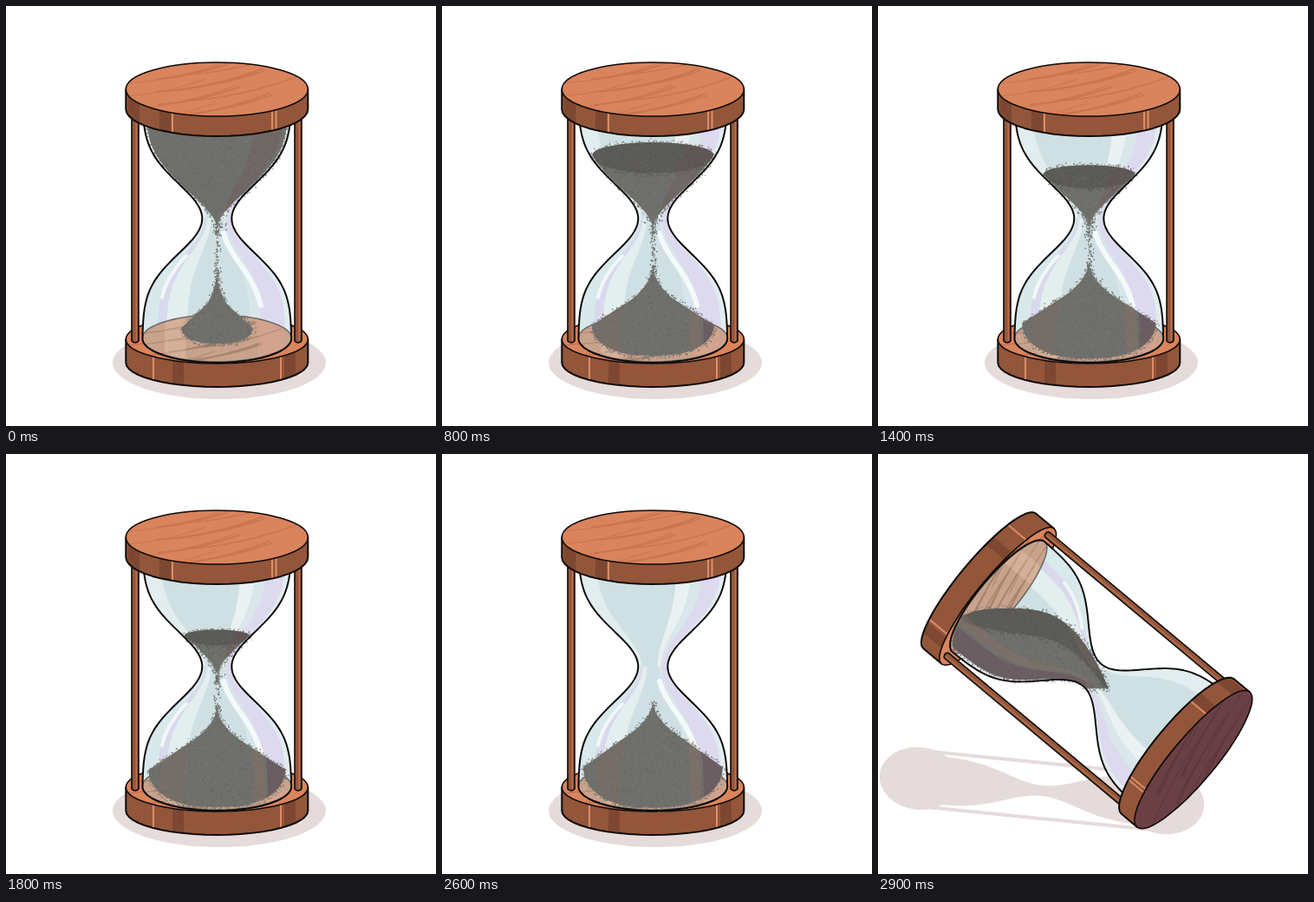
An HTML page with a canvas that plays this animation: 496 by 484 pixels, repeating every 3.1 s.

```html
<!DOCTYPE html>
<html lang="en">
<head>
<meta charset="utf-8">
<title>Hourglass</title>
<style>
html, body { margin: 0; width: 100%; height: 100%; overflow: hidden; background: #fff; }
canvas { display: block; }
</style>
</head>
<body>
<canvas id="stage" width="496" height="484"></canvas>
<script>
const ctx = document.getElementById('stage').getContext('2d');
const CX = 243.3, NECK = 245, FLOOR = 383, INK = '#0d0a09', SHADOW = '#e5dbda';
const WOOD = '#93563a', WOOD_DARK = '#7d4731', WOOD_LIGHT = '#dd8d66', FACE = '#d9845c';
const SAND = '#6f706b', SAND_TOP = '#5c5b57', LAVENDER = '#dddaf0', MIST = '#e1edee';

let seed = 1;
let flat = 1; // how open the discs look: 1 upright, less when tipped
const rnd = () => (seed = (seed * 16807) % 2147483647) / 2147483647;
const fuzz = s => (rnd() + rnd() + rnd() - 1.5) * s;
const bell = (d, width) => 1 - Math.exp(-((d / width) ** 2));

const glassHalf = y => 17 + 69 * bell(y - NECK, 57);
const sandHalf = y => glassHalf(y) * .96 * bell(y - 256, 22);

function fill(path, color) { ctx.fillStyle = color; ctx.fill(path); }

function stroke(path, width, color = INK) {
  ctx.lineWidth = width;
  ctx.strokeStyle = color;
  ctx.stroke(path);
}

function inside(path, draw) {
  ctx.save();
  ctx.clip(path);
  draw();
  ctx.restore();
}

function polygon(pts) {
  const p = new Path2D();
  pts.forEach(([x, y]) => p.lineTo(x, y));
  p.closePath();
  return p;
}

function ellipse(x, y, rx, ry) {
  const p = new Path2D();
  p.ellipse(x, y, rx, ry, 0, 0, Math.PI * 2);
  return p;
}

const range = (a, b, n, f) => Array.from({ length: n + 1 }, (_, i) => f(a + (b - a) * i / n));
const arc = (x, y, rx, ry, a, b) =>
  range(a, b, 24, t => [x + rx * Math.cos(t), y + ry * Math.sin(t)]);

// Glass contour from one rim round the floor to the other
const outline = (inset, top) => [
  ...range(top, FLOOR, 70, y => [CX - inset * glassHalf(y), y]),
  ...arc(CX, FLOOR, 86 * inset, 28 * flat * inset, Math.PI, 0),
  ...range(FLOOR, top, 70, y => [CX + inset * glassHalf(y), y])
];

// Strip of glass between two fractions of its half width
function band(lower, u0, u1, color) {
  const [a, b] = lower ? [NECK, 413] : [118, NECK + 1];
  const side = u => y => [CX + u * glassHalf(y), y];
  fill(polygon([...range(a, b, 60, side(u0)), ...range(b, a, 60, side(u1))]), color);
}

function streaks(y, rx, ry, color) {
  inside(ellipse(CX, y, rx, ry), () => {
    for (let i = 0; i < 13; i++) {
      const x = CX - rx + (i * 67 % 100) / 100 * rx, yy = y - ry * .7 + i * ry * .16;
      const len = rx * (.8 + (i * 31 % 60) / 100);
      stroke(new Path2D(`M${x},${yy} q${len / 2},-4 ${len},-${len * .22 * flat}`), 1 + i % 3 * .5, color);
    }
  });
}

function cap(y, height, ry, face, grain, light, dark) {
  const side = polygon([[CX - 105, y], ...arc(CX, y + height, 105, ry, Math.PI, 0), [CX + 105, y]]);
  fill(side, WOOD);
  inside(side, () => {
    ctx.fillStyle = WOOD_DARK;
    dark.forEach(x => ctx.fillRect(x, y, 13, 60));
    ctx.fillStyle = WOOD_LIGHT;
    light.forEach(x => ctx.fillRect(x, y, 2, 60));
  });
  stroke(side, 2);
  const top = ellipse(CX, y, 105, ry);
  fill(top, face);
  streaks(y, 105, ry, grain);
  stroke(top, 1.6);
}

function rod(x) {
  const p = new Path2D(`M${x},120 V386 q4,4 8,0 V120 Z`);
  fill(p, WOOD);
  ctx.fillStyle = '#b5704f';
  ctx.fillRect(x + 4.5, 120, 1.5, 266);
  stroke(p, 1.6);
}

function glassBody(glass) {
  inside(glass, () => {
    fill(glass, '#cfe0e4');
    band(false, -1, -.76, MIST);
    band(false, .32, .52, '#e9f1f2');
    band(false, .52, .68, '#dae7ea');
    band(false, .68, .93, LAVENDER);
    band(false, .93, 1, MIST);
    band(true, -1, -.8, '#d8e9eb');
    band(true, -.8, -.68, '#d9d8ee');
    band(true, -.68, -.4, '#e3eeee');
    band(true, .45, .6, '#d7e6ea');
    band(true, .6, .92, LAVENDER);
    band(true, .92, 1, MIST);
    const floor = ellipse(CX, FLOOR, 86, 27 * flat);
    fill(floor, '#c9a28c');
    streaks(FLOOR, 86, 27 * flat, '#a98470');
    inside(floor, () => {
      band(true, -.7, -.42, 'rgba(240,205,180,.3)');
      band(true, .55, .9, 'rgba(225,165,145,.3)');
    });
    stroke(floor, 1.6, '#6d6c68');
    stroke(new Path2D('M251,262 C258,290 284,306 294,345'), 6, '#f4f9f9');
    stroke(new Path2D('M208,288 C194,302 184,318 180,336'), 4, '#f1f6f6');
  });
}

function speckle(pts, spread) {
  pts.forEach(([x, y], i) => {
    const [nx, ny] = pts[(i + 1) % pts.length];
    const n = Math.hypot(nx - x, ny - y) * 1.3;
    for (let j = 0; j < n; j++) {
      const t = rnd(), s = .8 + rnd() * .7;
      ctx.fillRect(x + (nx - x) * t + fuzz(spread), y + (ny - y) * t + fuzz(spread), s, s);
    }
  });
}

// Grainy heap; toGlass switches to the glass's own axes for the tints
function sand(pts, surface, toGlass = () => {}) {
  const shape = polygon(pts);
  fill(shape, SAND);
  speckle(pts, 3.6);
  inside(shape, () => {
    if (surface) {
      fill(polygon(surface), SAND_TOP);
      speckle(surface, 4);
    }
    const xs = pts.map(p => p[0]), ys = pts.map(p => p[1]);
    const x0 = Math.min(...xs), y0 = Math.min(...ys);
    const w = Math.max(...xs) - x0, h = Math.max(...ys) - y0;
    for (let i = 0; i < w * h / 16; i++) {
      ctx.fillStyle = i % 2 ? 'rgba(145,148,141,.25)' : 'rgba(70,70,66,.25)';
      ctx.fillRect(x0 + rnd() * w, y0 + rnd() * h, 1.2, 1.2);
    }
    toGlass();
    band(false, .5, .9, 'rgba(110,75,80,.22)');
    band(true, -.76, -.42, 'rgba(130,105,95,.28)');
    band(true, .5, .64, 'rgba(140,112,102,.4)');
    band(true, .68, .96, 'rgba(92,55,82,.3)');
  });
}

function upperSand(step) {
  const back = step ? 137 + 96 * ((step - 1) / 11) ** 1.2 : 105;
  const y = back + sandHalf(back + 10) * .2, rx = sandHalf(y);
  const rim = arc(CX, y, rx, y - back, Math.PI, Math.PI * 2);
  const side = sign => yy => [CX + sign * sandHalf(yy), yy];
  const surface = [...rim, ...arc(CX, y, rx, rx * .3, 0, Math.PI)];
  sand([...rim, ...range(y, 262, 30, side(1)), ...range(262, y, 30, side(-1))], step && surface);
}

// The pile widens quickly at first, then only grows in height
function lowerSand(step) {
  const spread = 1 - Math.exp(-step / 3), age = step / 13;
  const peak = 304 - 20 * age, bottom = 389 + 19 * spread;
  const shoulder = 11 + 15 * spread, sy = 343 - 21 * age;
  const foot = 41 + 40 * spread, fy = 371 - 10 * age;
  const half = [
    ...range(0, 1, 8, t => [shoulder * t ** 1.6, peak + (sy - peak) * t ** .8]),
    ...range(0, Math.PI / 2, 10, a =>
      [foot * Math.cos(a) ** .8, fy + (bottom - fy) * Math.sin(a)])
  ];
  const mirrored = half.map(([w, y]) => [CX - w, y]).reverse();
  sand([...half.map(([w, y]) => [CX + w, y]), ...mirrored]);
  if (step > 12) return;
  ctx.fillStyle = SAND;
  for (let i = 0; i < 75; i++) {
    const y = 234 + rnd() * (peak - 222);
    ctx.fillRect(CX + fuzz(y < 258 ? 9 : 4), y, 1.4, 1.6);
  }
}

// Sand lying in the tipped bulb: the glass contour below a surface line
function pool({ level, end }, toGlass) {
  const m = ctx.getTransform();
  const edge = outline(.95, 240)
    .map(([x, y]) => new DOMPoint(x, y).matrixTransform(m))
    .filter(p => p.y > level(p.x))
    .map(p => [p.x, p.y]);
  const start = edge[0][0];
  const line = range(end, start, 24, x => [x, level(x)]);
  const front = range(0, 1, 24, t => {
    const x = start + (end - start) * t;
    return [x, level(x) + 30 * Math.sqrt(Math.max(0, Math.sin(Math.PI * t)))];
  });
  ctx.resetTransform();
  sand([...edge, ...line], [...line, ...front], toGlass);
}

// Silhouette lying on the ground
function longShadow({ x, y, reach, ry, turn }) {
  ctx.translate(x, y);
  ctx.rotate(turn);
  const side = sign => d => [d, sign * (6 + ry * .62 * bell(d, 58))];
  fill(polygon([...range(-reach, reach, 40, side(-1)), ...range(reach, -reach, 40, side(1))]), SHADOW);
  for (const s of [-1, 1]) {
    fill(ellipse(s * reach, 0, 46, ry), SHADOW);
    stroke(new Path2D(`M${-reach},${s * (ry - 4)} H${reach}`), 4, SHADOW);
  }
  ctx.resetTransform();
}

const UPRIGHT = { x: CX, y: 240, turn: 0, sx: 1, sy: 1, flat: 1 };
const TIPPED = { sx: .965, sy: 1.02, flat: .8 };
const POSES = [
  UPRIGHT,
  {
    ...TIPPED, x: 252, y: 243, turn: .83,
    shadow: { x: 293, y: 408, reach: 146, ry: 43, turn: -.015 },
    pool: { level: () => 291, end: 246 }
  },
  {
    ...TIPPED, x: 251, y: 258, turn: 2.266,
    shadow: { x: 189, y: 388, reach: 142, ry: 36, turn: .1 },
    pool: { level: x => 178 + 90 * Math.abs((x - 150) / 115) ** 3, end: 266 }
  }
];

function draw(step) {
  seed = 991 + step * 7717;
  const pose = POSES[Math.max(0, step - 13)];
  const toGlass = () => {
    ctx.resetTransform();
    ctx.translate(pose.x, pose.y);
    ctx.rotate(pose.turn);
    ctx.scale(pose.sx, pose.sy);
    ctx.translate(-CX, -240);
  };
  flat = pose.flat;
  ctx.resetTransform();
  ctx.fillStyle = '#fff';
  ctx.fillRect(0, 0, 496, 484);
  if (pose.shadow) longShadow(pose.shadow);
  else fill(ellipse(246, 411, 123, 42), SHADOW);

  toGlass();
  const glass = polygon(outline(1, 120));
  cap(384, 27, 28 * flat, FACE, '#b9694a', [169, 316], [192, 321]);
  glassBody(glass);
  if (pose.pool) {
    pool(pose.pool, toGlass);
    toGlass();
  } else {
    lowerSand(step);
    if (step < 13) upperSand(step);
  }
  stroke(glass, 2);
  rod(145);
  rod(333);
  const [face, grain] = step === 15 ? ['#6b4045', '#60383d'] : [FACE, '#c97550'];
  cap(96, 23, 31 * flat, face, grain, [191, 306, 310.5], [141, 177]);
}

ctx.lineJoin = ctx.lineCap = 'round';
let shown = -1;
function tick() {
  const t = performance.now() % 3100;
  const step = t < 2800 ? Math.floor(t / 200) : t < 2900 ? 14 : 15;
  if (step !== shown) draw(shown = step);
  requestAnimationFrame(tick);
}
tick();
</script>
</body>
</html>
```
